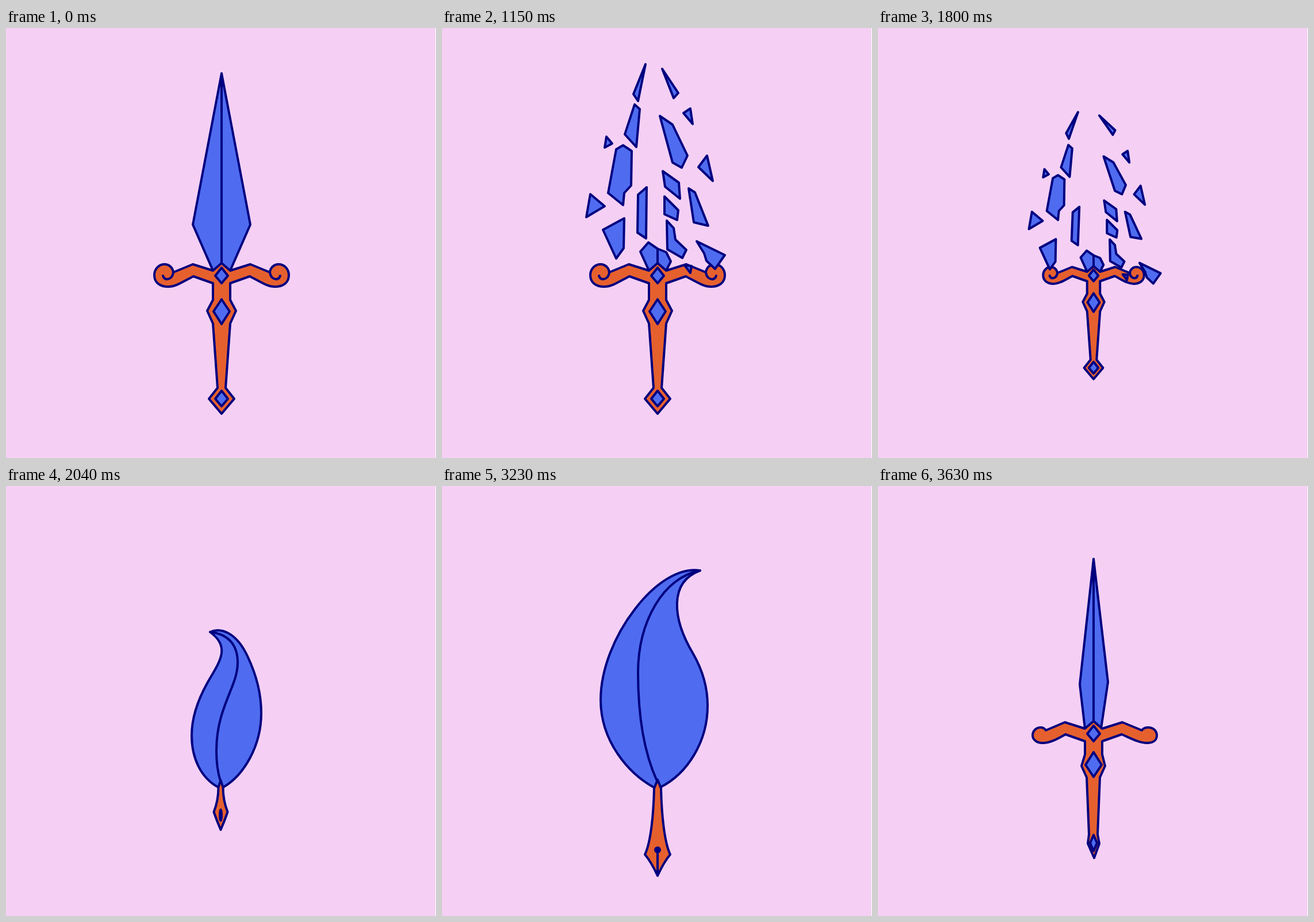
An HTML page with a canvas for the animation above (3.71 s loop, 748 by 748 pixels).

```html
<!DOCTYPE html>
<html lang="en">
<head>
<meta charset="utf-8">
<title>Dagger and quill</title>
<style>
html, body { margin: 0; height: 100%; overflow: hidden; background: #f5d0f4; }
canvas { display: block; width: 100vmin; height: 100vmin; }
</style>
</head>
<body>
<canvas width="748" height="748"></canvas>
<script>
const LOOP = 3710, NAVY = '#00007f', BLUE = '#4f6cf0', ORANGE = '#e6602e';
const ctx = document.querySelector('canvas').getContext('2d');

// Adds the mirror image around x = 375.
function mirrored(d) {
  const half = new Path2D(d), path = new Path2D(half);
  path.addPath(half, new DOMMatrix([-1, 0, 0, 1, 750, 0]));
  return path;
}

const smallDagger = {
  blade: new Path2D('M360 422L351 345L375 127L400 341L388 422'),
  spine: new Path2D('M375 127V410'),
  hilt: new Path2D('M375 409L390 422L425 411L459 425C461 422 465 420 470 420C479 420 485 426 485 434C485 442 479 447 468 447C454 447 440 439 424 432L390 444L390 467L395 487L386 507L382 606L385 622L376 647L365 622L367 606L363 507L354 487L360 467L360 444L326 432C312 440 300 447 286 447C276 447 269 441 269 434C269 426 275 420 283 420C287 420 290 422 292 425L325 411L360 422Z'),
  gems: mirrored('M375 417L386 431L375 444M375 463L389 485L375 506M375 607L381 621L375 635')
};
const dagger = {
  blade: mirrored('M375 79L425 342L390 422L375 422'),
  spine: new Path2D('M375 79V410'),
  hilt: mirrored('M375 409L390 422L425 411L459 425C460 416 467 411 474 411C484 411 492 419 492 430C492 443 482 450 468 450C454 450 440 440 424 432L390 444L390 473L400 492L390 514L382 626L397 645L375 671'),
  hooks: mirrored('M459 425C460 434 466 437 470 437C474 437 476 434 477 431'),
  gems: mirrored('M375 417L386 431L375 444M375 472L389 493L375 515M375 631L386 645L375 658')
};
const STUB = ['M375 384L359 373L345 389L360 422L375 422Z', 'M375 384L390 390L398 406L390 422L375 422Z'];

const curled = {
  dx: -1.5,
  leaf: 'M369 524C340 508 323 475 323 434C323 400 335 370 350 343C371 306 392 281 355 254C375 245 402 256 421 298C436 330 444 362 444 395C444 452 414 503 378 524Z',
  vein: 'M373 513C364 485 363 440 374 402C386 360 403 337 403 307C403 275 385 257 355 254',
  nib: 'M375 512L379 524C379 545 383 557 387 567Q382 582 375 598',
  slit: 'M375 563A1.5 9.5 0 0 1 375 582L375 582'
};
const bent = {
  dx: 0,
  leaf: 'M368 524C325 500 276 445 276 372C276 318 301 259 335 215C369 170 412 141 449 147C395 167 400 230 437 292C453 320 462 350 462 382C462 445 427 500 380 524Z',
  vein: 'M374 513C352 465 341 400 341 325C341 280 352 239 371 207C390 175 417 153 449 147',
  nib: 'M375 511L381 526C382 573 387 620 397 641Q386 654 375 678',
  slit: 'M375 629A4 4 0 0 1 375 637L375 677'
};
const upright = {
  dx: 0,
  leaf: 'M368 524C330 502 282 450 282 368C282 314 299 262 327 218C354 174 393 137 436 114C405 160 400 225 432 280C447 306 457 340 457 375C457 440 425 500 380 524Z',
  vein: 'M374 513C355 450 348 400 348 350C348 300 357 254 373 214C388 174 410 140 436 114',
  nib: 'M375 511L381 526C382 570 387 617 397 636Q386 648 375 672',
  slit: 'M375 624A4 4 0 0 1 375 632L375 671'
};

// Each shard: outline mid-flight, shift and turn back to the blade, shift and turn to rest.
const leftShards = [
  ['354 63 333 115 341 127', [28.6, 17.3, -11.5], [-20, -13, 7.5]],
  ['335 133 344 141 338 207 318 185', [33, 1, -7], [-18.5, -5, 0]],
  ['315 204 330 214 329 274 317 287 315 308 289 287 303 211', [45, 4, 0], [-22.5, -6, 0]],
  ['286 189 296 201 283 208', [67.5, 1, 0], [-25, -5, 0]],
  ['258 289 283 310 251 329', [76, 2, 0], [-26, -6, 0]],
  ['280 351 317 331 316 383 303 401', [43.5, -11, 0], [-29.5, 15.5, 0]],
  ['341 290 356 277 355 366 340 356', [19.3, 1.3, 0], [-15.2, -5.7, 1.5]]
];
const rightShards = [
  ['383 71 411 113 403 122', [-20.8, 11.8, 22], [12, -16, -13.5]],
  ['379 153 401 168 427 222 417 243 401 234', [-18, 0, 15], [21.8, 0, -3]],
  ['432 140 436 167 420 148', [-47, -8, 0], [22, 1.7, 0]],
  ['461 222 471 266 446 242', [-57, 8, 0], [23, 0.5, 0]],
  ['384 249 412 269 414 297 388 276', [-11.5, -5, 6], [15.5, 7.7, 0]],
  ['387 293 411 317 409 334 387 324', [-12, -12, 0], [19, 8.7, 0]],
  ['429 279 440 286 463 344 438 338', [-34.5, -17, 11], [21, 3, -3.5]],
  ['391 335 403 348 406 368 425 386 418 400 392 385', [-16.5, -3, 0], [21.5, 12.3, 0]],
  ['443 371 492 395 475 419 460 405 456 392', [-66, -48, -11], [38.5, 30.5, 0]],
  ['422 413 434 414 432 426', [-24, -40, 0], [20.5, 15, 0]]
];
const shards = [...leftShards, ...rightShards].map(([points, home, rest]) => {
  const n = points.split(' ').map(Number), count = n.length / 2;
  const sum = odd => n.reduce((s, v, i) => i % 2 === odd ? s + v : s, 0);
  return { path: new Path2D(`M${points}Z`), cx: sum(0) / count, cy: sum(1) / count, home, rest };
});

function mix(a, b, t) {
  const end = b.match(/[\d.]+/g);
  let i = 0;
  return a.replace(/[\d.]+/g, n => +n + (end[i++] - n) * t);
}

function paint(path, fill) {
  if (fill) {
    ctx.fillStyle = fill;
    ctx.fill(path);
  }
  ctx.stroke(path);
}

function zoom(scale, y, draw) {
  ctx.save();
  ctx.translate(375, y);
  ctx.scale(scale, scale);
  ctx.translate(-375, -y);
  ctx.lineWidth = 4 / scale;
  draw();
  ctx.restore();
}

function drawHilt(pose) {
  paint(pose.hilt, ORANGE);
  if (pose.hooks) paint(pose.hooks);
  paint(pose.gems, BLUE);
}

function drawDagger(pose, crack = 0) {
  paint(pose.blade, BLUE);
  if (crack) {
    ctx.save();
    ctx.clip(pose.blade);
    ctx.beginPath();
    ctx.arc(375, 300, crack * 80, 0, 7);
    ctx.clip();
    drawShards(0, false);
    ctx.restore();
  }
  paint(pose.spine);
  drawHilt(pose);
}

// phase 0: in the blade, 1: mid-flight, 2: at rest
function drawShards(phase, filled = true) {
  const part = Math.abs(phase - 1);
  for (const { path, cx, cy, home, rest } of shards) {
    const [dx, dy, turn] = (phase < 1 ? home : rest).map(v => v * part);
    ctx.save();
    ctx.translate(cx + dx, cy + dy);
    ctx.rotate(turn * Math.PI / 180);
    ctx.translate(-cx, -cy);
    paint(path, filled && BLUE);
    ctx.restore();
  }
}

function drawBurst(step) {
  const ease = s => 1 - (1 - s / 7) ** 1.6, p = ease(step), middle = ease(3);
  STUB.forEach(d => paint(new Path2D(d), BLUE));
  drawHilt(dagger);
  drawShards(p < middle ? p / middle : 1 + (p - middle) / (1 - middle));
}

function drawQuill(a, b = a, t = 0) {
  const part = name => mix(a[name], b[name], t);
  paint(new Path2D(part('leaf')), BLUE);
  paint(new Path2D(part('vein')));
  ctx.save();
  ctx.translate(a.dx + (b.dx - a.dx) * t, 0);
  paint(mirrored(part('nib')), ORANGE);
  paint(mirrored(part('slit')), NAVY);
  ctx.restore();
}

function draw(t) {
  const step = start => Math.floor((t - start) / 80);
  if (t < 580) drawDagger(dagger);
  else if (t < 990) drawDagger(dagger, Math.min(3, 1 + Math.floor((t - 580) / 40)));
  else if (t < 1800) drawBurst(Math.min(7, 1 + step(990)));
  else if (t < 1960) zoom([0.75, 0.4][step(1800)], 430, () => drawBurst(7));
  else if (t < 2040) zoom(0.5, 525, () => drawQuill(curled));
  else if (t < 2360) drawQuill(curled, bent, [0, 0.4, 0.75, 1][step(2040)]);
  else if (t < 3230) drawQuill(upright);
  else if (t < 3470) zoom([1, 0.65, 0.3][step(3230)], 500, () => drawQuill(bent));
  else zoom([0.3, 0.65, 1][step(3470)], 430, () => drawDagger(smallDagger));
}

const begin = performance.now();
function frame() {
  ctx.fillStyle = '#f5d0f4';
  ctx.fillRect(0, 0, 748, 748);
  ctx.fillStyle = '#fff';
  ctx.fillRect(747, 0, 1, 748);
  ctx.strokeStyle = NAVY;
  ctx.lineWidth = 4;
  ctx.lineJoin = ctx.lineCap = 'round';
  draw((performance.now() - begin) % LOOP);
  requestAnimationFrame(frame);
}
frame();
</script>
</body>
</html>
```
